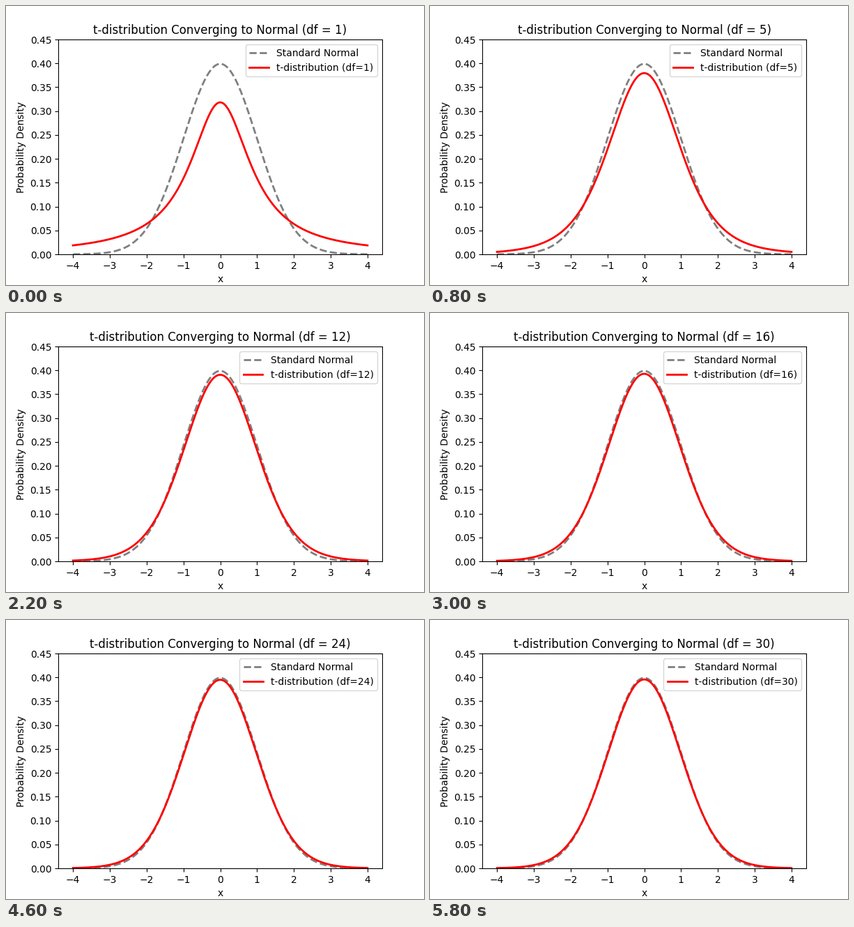
Write a matplotlib script that moves like this. It is 600 px wide and 400 px high and loops after 6 s.

```python
import math

import matplotlib.pyplot as plt
import numpy as np
from matplotlib.animation import FuncAnimation

MAX_DF = 30
STEP_MS = 200

x = np.linspace(-4, 4, 500)


def normal_pdf(x):
    return np.exp(-x**2 / 2) / math.sqrt(2 * math.pi)


def t_pdf(x, df):
    scale = math.exp(math.lgamma((df + 1) / 2) - math.lgamma(df / 2))
    return scale / math.sqrt(df * math.pi) * (1 + x**2 / df) ** (-(df + 1) / 2)


plt.rcdefaults()
fig, ax = plt.subplots(figsize=(6, 4), dpi=100)
ax.plot(x, normal_pdf(x), color="gray", ls="--", lw=2, label="Standard Normal")
(curve,) = ax.plot(x, t_pdf(x, 1), color="red", lw=2, label="t-distribution (df=1)")
ax.set_ylim(0, 0.45)
ax.set_xlabel("x")
ax.set_ylabel("Probability Density")
title = ax.set_title("")
legend = ax.legend(loc="upper right")
curve_label = legend.get_texts()[1]


def update(i):
    df = i + 1
    curve.set_ydata(t_pdf(x, df))
    title.set_text(f"t-distribution Converging to Normal (df = {df})")
    curve_label.set_text(f"t-distribution (df={df})")
    return curve, title, legend


anim = FuncAnimation(fig, update, frames=MAX_DF, interval=STEP_MS,
                     repeat=True, repeat_delay=0, blit=False)
plt.show()
```
